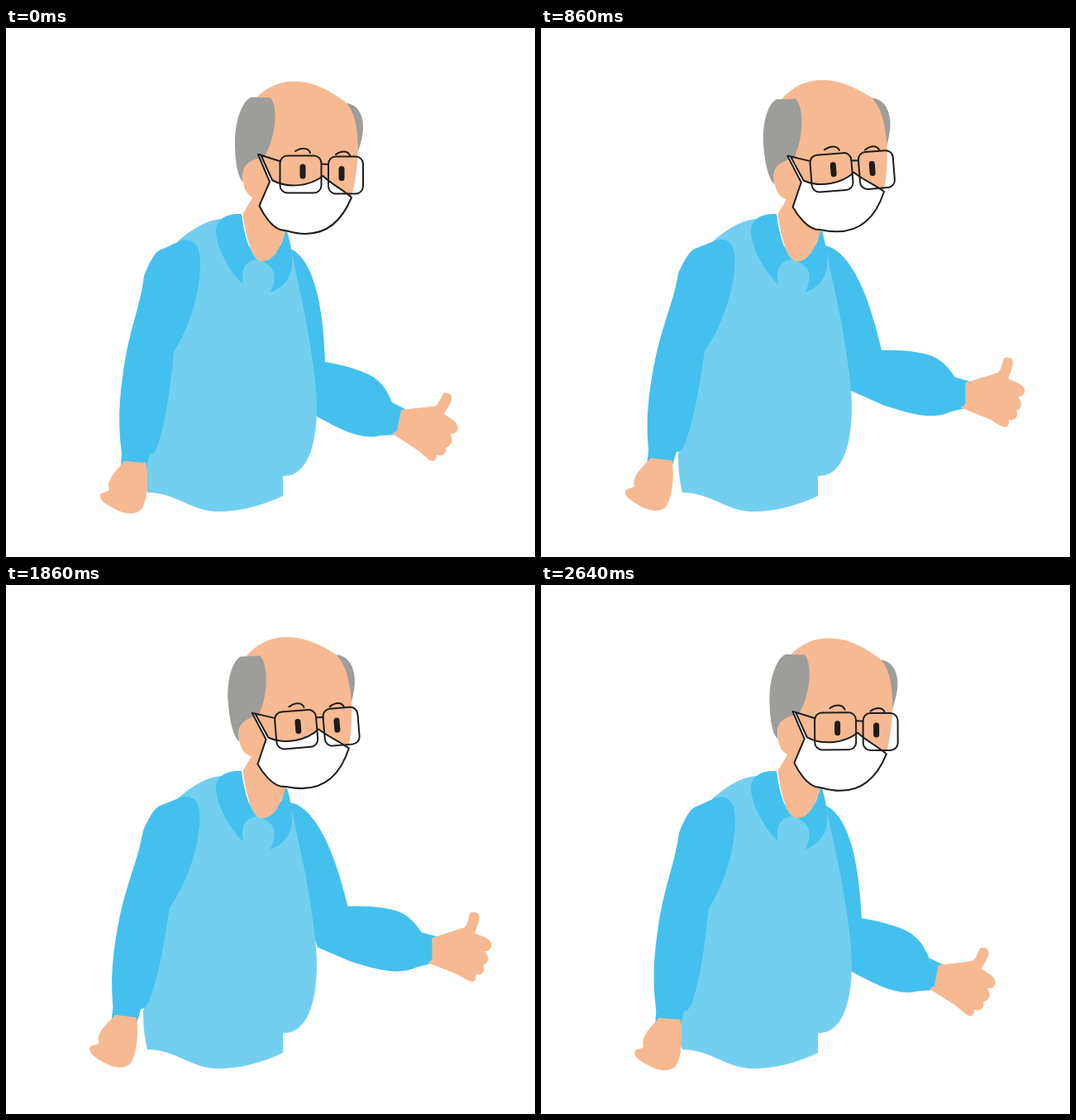
Write an HTML page that moves like this. It is 640 px wide and 640 px high and loops after 2710 ms.

```html
<!DOCTYPE html>
<html lang="en">
<head>
<meta charset="utf-8">
<title>Thumbs up</title>
<style>
  html, body { margin: 0; height: 100%; overflow: hidden; background: #fff; }
  svg { display: block; width: 100%; height: 100%; }
  .skin { fill: #f7b991; }
  .sleeve { fill: #44c0ee; }
  .vest { fill: #72cff0; }
  .hair { fill: #9d9d9a; }
  .line { fill: none; stroke: #1d1d1b; stroke-width: 2; stroke-linecap: round; stroke-linejoin: round; }
  .eye { fill: #1d1d1b; }
</style>
</head>
<body>
<svg viewBox="0 0 640 640">
  <g id="thumbArm">
    <path class="sleeve" d="M325 262L346 268C372 282 384 335 386 404C411 408 437 416 448 425C458 433 463 443 467 453L485 462L473 492L453 493C430 499 405 486 376 470L340 445Z"/>
    <path class="skin" d="M478 462L519 457.500C526 453 526 445 530 441.500C538 441 540 445 539 450C537 457 533 461 530 467C536 472 546 475 547 484C546 490 542 491 537 491C541 496 541 505 532 507C534 513 529 520 521 516C521 522 517 526 513 523C505 518 502 513 497 510L467 490.500C472 488 473 488 473.500 485Z"/>
  </g>

  <path class="vest" d="M208 258C225 243 245 231 262 231L300 270L346 272C353 310 362 340 370 397C374 425 376 440 376 458C376 510 362 543 335 542L335 566C310 578 283 585 256 585C225 585 205 562 171 562C167 545 166 530 166 515C180 485 188 450 197 391Z"/>
  <path class="skin" d="M299 204L286.500 225C290 250 297 282 310 282.500C325 282 333 262 339 245L339 200Z"/>
  <path class="sleeve" d="M285 225C270 224 254 229 254 246C255 270 275 300 287 310C283 291 291 281 303 280C295 272 288 250 285 225ZM338 246C333 266 324 282 310 282.500C325 288 329 301 319.500 320C341 312 348 296 346 276C345 264 342 252 340 246Z"/>

  <g id="restArm">
    <path class="sleeve" d="M188 268C180 270 173 285 167 300C163 335 149 365 142 415C136 455 136 485 140 515L139 529L170 531L174 515C180 517 184 505 186 497C196 465 201 410 203 392C222 362 235 320 235 285C235 260 225 253 210 258Z"/>
    <path class="skin" d="M143 524L169 526C173 545 171 572 164 582C156 591 140 587 130 581C120 576 113 571 114 565C116 561 122 562 125 559C122 552 126 546 129 541C134 534 139 529 143 524Z"/>
  </g>

  <g id="head">
    <path class="hair" d="M412 91C428 93 434 110 431.500 128C430 137 428 143 425 152Z"/>
    <path class="skin" d="M303 84C331 56 371 58 411 90C423 102 426 125 426 150C424 178 421 195 417 205L380 235L320 215L299 205C290 201 287 192 287 184C284 168 296 157 306 158Z"/>
    <path class="hair" d="M303 84L320 84.500C330 97 326 134 312 157C298 158 283 164 287 186C280 181 277 160 277 138C277 110 287 87 297 83.500Z"/>
    <path class="line" fill="#fff" style="fill:#fff" d="M305 153L319 186L306.500 215C312 227 322 241 332 244L340 245.500C380 257 404 239 418 205C408 196 394 189 383.500 179C368 191 342 195 322 184L309 155"/>
    <path class="line" d="M306 153L331 161M381.500 164.500L390 165M350 149C358 144 366 145 368 151M399 153C406 148 414 148 416.500 155"/>
    <rect class="eye" x="355.500" y="164.500" width="7" height="18" rx="3.500" data-y="173.500"/>
    <rect class="eye" x="402.500" y="167" width="7" height="18" rx="3.500" data-y="176"/>
    <rect class="line" x="331.500" y="154.500" width="50" height="45" rx="9"/>
    <rect class="line" x="390" y="155.500" width="42" height="45" rx="9"/>
  </g>
</svg>
<script>
  const LOOP = 2710, STEPS = 38, PEAK = 1400, BLINK = 1500;
  const eyes = document.querySelectorAll(".eye");

  const turn = (id, angle, x, y) =>
    document.getElementById(id).setAttribute("transform", `rotate(${angle} ${x} ${y})`);

  // Nearly constant speed that settles softly at the top.
  const swing = u => 0.85 * u + 1.3 * u * u - 1.15 * u ** 3;

  function draw(now) {
    const step = Math.floor((now % LOOP) / LOOP * STEPS + 0.1) % STEPS;
    const t = step * LOOP / STEPS;
    const lift = swing(t < PEAK ? t / PEAK : (LOOP - t) / (LOOP - PEAK));
    turn("thumbArm", -14.8 * lift, 325.4, 262);
    turn("restArm", 3.2 * lift, 228, 272);
    turn("head", -6 * lift, 326, 240);

    const open = Math.min(1, 0.45 + Math.abs(t - BLINK) / 330);
    for (const eye of eyes) {
      const height = 18 * open;
      eye.setAttribute("height", height);
      eye.setAttribute("y", eye.dataset.y - height / 2);
    }
  }

  function tick() {
    draw(performance.now());
    requestAnimationFrame(tick);
  }
  tick();
</script>
</body>
</html>
```
